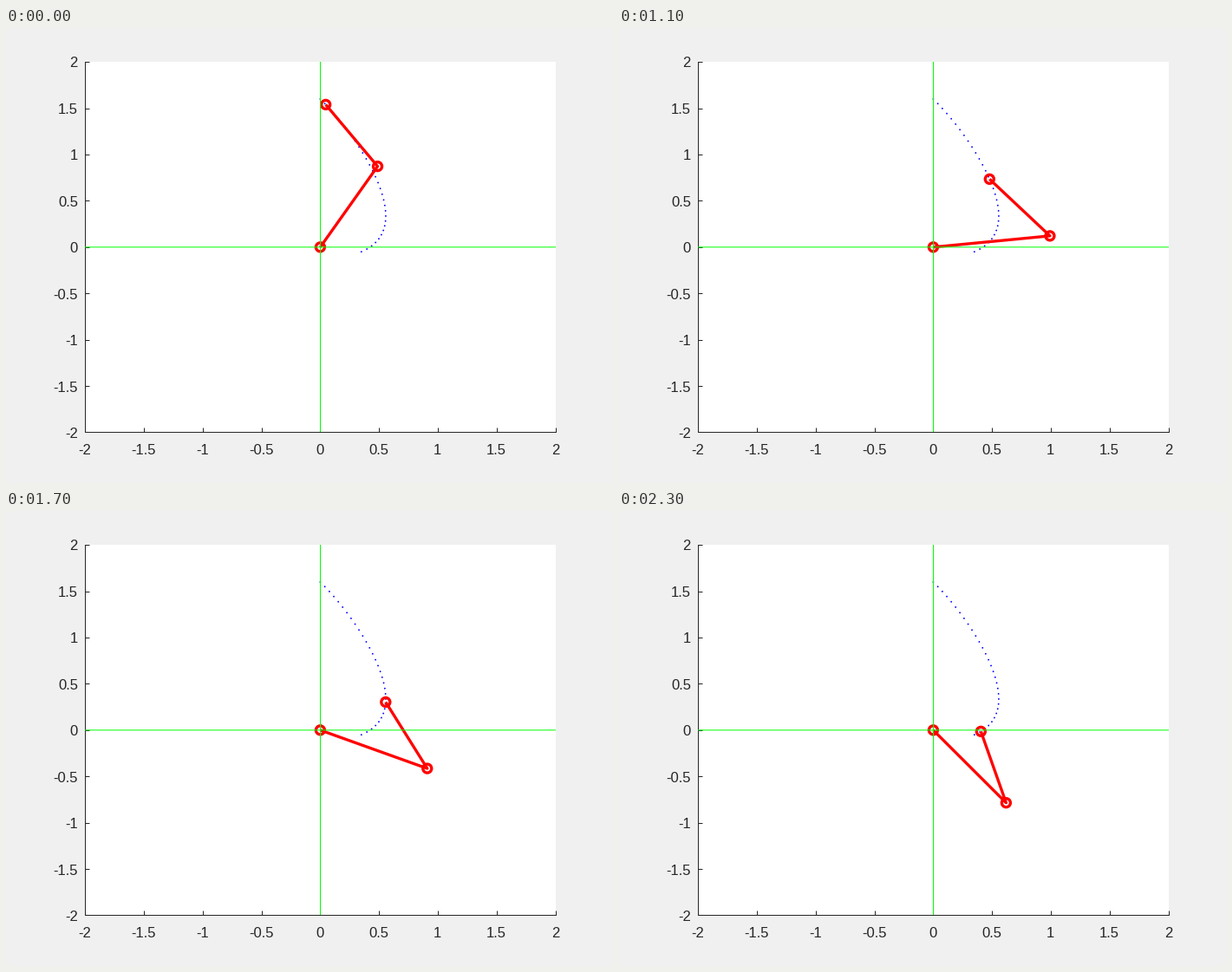
These frames come from a looping animation (700 px wide and 525 px high, 2400 ms). A matplotlib script:

```python
import numpy as np
import matplotlib.pyplot as plt
from matplotlib.animation import FuncAnimation

W, H, DPI = 700, 525, 120
FRAMES, INTERVAL = 24, 100
LEFT, TOP, RIGHT, BOTTOM = 91.3, 39.25, 633.5, 466.45
L1, L2 = 1.0, 0.8
INK = "#262626"

plt.rcParams["font.family"] = "Liberation Sans"


def path(s):
    """Tip position along the curve, s from 0 to 1."""
    r = 1 - s
    b1, b2, b3 = 3 * s * r**2, 3 * s**2 * r, s**3
    x = 0.3887 * b1 + 0.8537 * b2 + 0.35 * b3 - 0.289 * (s * r) ** 2
    y = 1.6 * r**3 + 1.116 * b1 + 0.225 * b2 - 0.05 * b3
    return x, y


def elbow(x, y):
    """Two-link inverse kinematics, elbow on the right."""
    d = np.hypot(x, y)
    bend = np.arccos((d**2 + L1**2 - L2**2) / (2 * L1 * d))
    q = np.arctan2(y, x) - bend
    return L1 * np.cos(q), L1 * np.sin(q)


def label(text, x, y, ha):
    fig.text(x / W, 1 - y / H, text, ha=ha, va="baseline", size=10, color=INK)


fig = plt.figure(figsize=(W / DPI, H / DPI), dpi=DPI, facecolor="#f0f0f0")
ax = fig.add_axes([LEFT / W, 1 - BOTTOM / H, (RIGHT - LEFT) / W,
                   (BOTTOM - TOP) / H], facecolor="white")
ax.set(xlim=(-2, 2), ylim=(-2, 2))
ticks = np.arange(-2, 2.1, 0.5)
ax.set_xticks(ticks, [""] * len(ticks))
ax.set_yticks(ticks, [""] * len(ticks))
ax.tick_params(direction="in", length=3.2, width=0.6, color=INK)
for side, spine in ax.spines.items():
    spine.set_visible(side in ("left", "bottom"))
    spine.set(linewidth=0.6, edgecolor=INK)

for v in ticks:
    name = f"{v:g}"
    label(name, 362.25 + v * 135.6, 492, "center")
    label(name, 83, 259.4 - v * 106.97, "right")

# Unfilled or unstroked scatters keep sub-pixel positions.
ax.scatter(*path(np.linspace(0, 1, 31)), s=1.2, color="blue",
           edgecolors="none", zorder=2)
links, = ax.plot([], [], color="red", lw=2, solid_capstyle="butt",
                 solid_joinstyle="round", zorder=3)
joints = ax.scatter([0] * 3, [0] * 3, s=36, facecolors="none",
                    edgecolors="red", linewidths=2, zorder=3)
ax.plot([-2, 2], [0, 0], color="lime", lw=0.6, snap=False, zorder=4)
ax.plot([0, 0], [-2, 2], color="lime", lw=0.6, snap=True, zorder=4)


def update(i):
    tip = path((i + 1) / (FRAMES + 1))
    points = np.array([(0, 0), elbow(*tip), tip])
    links.set_data(*points.T)
    joints.set_offsets(points)
    return links, joints


anim = FuncAnimation(fig, update, frames=FRAMES, interval=INTERVAL,
                     repeat=True, repeat_delay=0)
plt.show()
```
